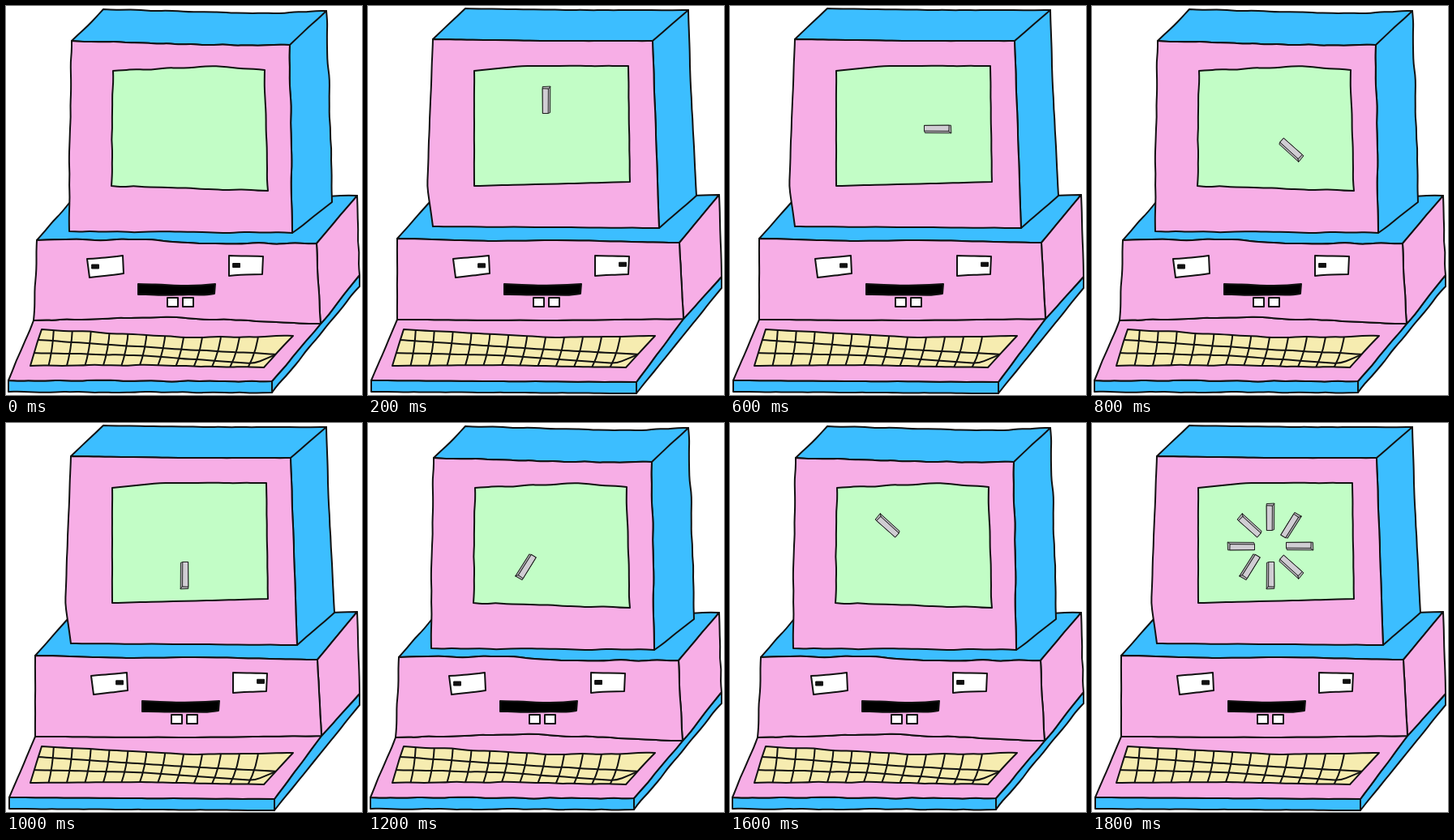
Animation, 439 px wide and 480 px high, one loop 2000 ms. Source, as an HTML page:

```html
<!DOCTYPE html>
<html lang="en">
<head>
<meta charset="utf-8">
<title>Computer with a loading spinner</title>
<style>
  html, body { margin: 0; width: 100%; height: 100%; overflow: hidden; background: #fff; }
  svg { display: block; width: 439px; height: 480px; }
  path { stroke: #111; stroke-width: 2; stroke-linejoin: round; stroke-linecap: round; }
  .bar path { stroke-width: 0.9; }
  .pupil path { stroke-width: 1; }
</style>
</head>
<body>
<svg id="stage" viewBox="0 0 439 480" xmlns="http://www.w3.org/2000/svg"></svg>
<script>
const PINK = '#f7aee6', BLUE = '#3cbeff', GREEN = '#c2fdc6', CREAM = '#f6ecb0';
const STEP = 200, STEPS = 10, BARS = 8, RIM = 14;

// Two drawings of the same machine; faces share these points.
const poses = [
  {
    wobble: 0.9, faceX: 0, glance: 0,
    tl: [81, 43], tm: [256, 48], tr: [350, 48], br: [353, 280], bl: [78, 278], lm: [79, 150],
    backL: [120, 4], backM: [330, 9], backR: [395, 6], sideM: [400, 150], sideB: [402, 242],
    screen: [[132, 80], [253, 74], [319, 79], [323, 228], [130, 222]],
    baseL: [38, 289], baseU: [180, 288], baseD: [239, 293], baseR: [383, 293],
    farL: [78, 243], farR: [433, 234], low: [436, 332],
    deckTL: [34, 388], deckTM: [191, 384], deckTR: [388, 392], deckBL: [3, 462], deckBR: [328, 463]
  },
  {
    wobble: 0.25, faceX: 5, glance: 25,
    tl: [80, 41], tm: [220, 43], tr: [351, 43], br: [359, 274], bl: [80, 272], lm: [73, 222],
    backL: [120, 3], backM: [250, 5], backR: [395, 5], sideM: [398, 100], sideB: [405, 234],
    screen: [[131, 80], [190, 74], [321, 74], [323, 217], [131, 222]],
    baseL: [36, 287], baseU: [150, 290], baseD: [240, 289], baseR: [384, 292],
    farL: [76, 242], farR: [433, 233], low: [436, 334],
    deckTL: [36, 387], deckTM: [220, 388], deckTR: [389, 386], deckBL: [4, 462], deckBR: [331, 464]
  }
];
const keys = [[44, 399], [229, 409], [354, 407], [318, 446], [160, 443], [30, 444]];
const keyRows = [[[38, 412], [221, 424], [338, 430]], [[32, 428], [164, 431], [306, 441], [335, 429]]];
const mouth = [[163, 343], [207, 345], [258, 343], [257, 355], [245, 357], [163, 356]];
const eyes = [
  [[100, 312], [144, 308], [145, 330], [103, 335]],
  [[275, 308], [317, 309], [316, 331], [275, 333]]
];

const lerp = (a, b, t) => a + (b - a) * t;
const mix = (a, b, t) => [lerp(a[0], b[0], t), lerp(a[1], b[1], t)];
const fix = p => p.map(n => n.toFixed(1)).join(' ');
const box = (x, y, w, h) => [[x, y], [x + w, y], [x + w, y + h], [x, y + h]];

// Noise depends on position, so shared edges wobble alike.
const noise = (x, y) => {
  const n = Math.sin(x * 12.9898 + y * 78.233) * 43758.5453;
  return (n - Math.floor(n)) * 2 - 1;
};

function roughen(pts, amp, closed) {
  return pts.flatMap((a, i) => {
    if (i === pts.length - 1 && !closed) return [a];
    const b = pts[(i + 1) % pts.length], out = [a];
    const n = Math.floor(Math.hypot(b[0] - a[0], b[1] - a[1]) / 13);
    for (let k = 1; k < n; k++) {
      const [x, y] = mix(a, b, k / n);
      out.push([x + amp * noise(x, y), y + amp * noise(y, x)]);
    }
    return out;
  });
}

// Rounds gentle bends and keeps sharp corners.
function outline(corners, amp, closed = true) {
  const pts = roughen(corners, amp, closed), n = pts.length;
  let d = 'M' + fix(pts[0]);
  for (let i = 1; i < n; i++) {
    const a = pts[i - 1], p = pts[i], b = pts[(i + 1) % n];
    const turn = Math.atan2(b[1] - p[1], b[0] - p[0]) - Math.atan2(p[1] - a[1], p[0] - a[0]);
    const sharp = Math.cos(turn) < 0.82 || (!closed && i === n - 1);
    d += sharp ? 'L' + fix(p) : 'Q' + fix(p) + ' ' + fix(mix(p, b, 0.5));
  }
  return d + (closed ? 'Z' : '');
}

const path = (d, fill = 'none') => `<path d="${d}" fill="${fill}"/>`;

function computer(p, id) {
  const shape = (pts, fill) => path(outline(pts, p.wobble), fill);
  const line = pts => path(outline(pts, p.wobble * 0.5, false));
  const face = (names, fill) => shape(names.split(' ').map(n => p[n]), fill);
  const drop = ([x, y]) => [x, y + RIM];

  const rim = [p.deckBL, p.deckBR, p.deckTR, p.low, drop(p.low), drop(p.deckBR), drop(p.deckBL)];
  const columns = Array.from({ length: 12 }, (_, i) => {
    const x = 59 + i * 23, lean = 8 + i * 0.7;
    return path(`M${x} 396Q${x - 1} 424 ${x - lean} 450`);
  }).join('');
  const pupils = [[106, 319], [280, 317.5]].map(([x, y]) =>
    shape(box(x + p.glance, y - p.glance * 0.05, 8.5, 5), '#111')).join('');
  const teeth = [199, 218].map(x => shape(box(x, 360, 13, 11), '#fff')).join('');

  return `<g id="pose${id}">` +
    face('baseL baseU baseD baseR farR farL', BLUE) + shape(rim, BLUE) +
    face('baseR farR low deckTR', PINK) +
    face('deckTL deckTM deckTR deckBR deckBL', PINK) +
    face('baseL baseU baseD baseR deckTR deckTM deckTL', PINK) +
    line([p.deckBR, drop(p.deckBR)]) +
    face('tl backL backM backR sideM sideB br tr tm', BLUE) +
    face('tl tm tr br bl lm', PINK) + line([p.tr, p.backR]) + shape(p.screen, GREEN) +
    `<clipPath id="clip${id}">${shape(keys, CREAM)}</clipPath>` + shape(keys, CREAM) +
    `<g clip-path="url(#clip${id})">${columns}${keyRows.map(line).join('')}</g>` +
    `<g transform="translate(${p.faceX} 0)">` +
    eyes.map(e => shape(e, '#fff')).join('') + `<g class="pupil">${pupils}</g>` +
    teeth + shape(mouth, '#000') + '</g></g>';
}

// Bars sit on a ring, clockwise from the top; each axis has its own hand-drawn lean.
function bar(i) {
  const turn = i * 360 / BARS, a = (turn - 90) * Math.PI / 180;
  const lean = [0, -13, 0, -3][i % 4];
  const x = 220 + 36 * Math.cos(a), y = 152 + 36 * Math.sin(a);
  return `<g class="bar" transform="translate(${fix([x, y])}) rotate(${turn + 90 + lean})">` +
    path('M-16.5 -4.8L15.5 -4.6L16.5 -2.2L16.5 4.6L-16 4.8Z', '#b3b0b6') +
    path('M-13.5 -2.4L16.5 -2.2L16.5 4.6L-13.8 4.8Z', '#d0cdd3') +
    path('M-16.5 -4.8L-13.5 -2.4') + '</g>';
}

const stage = document.getElementById('stage');
stage.innerHTML = poses.map(computer).join('') +
  Array.from({ length: BARS }, (_, i) => bar(i)).join('');
const poseEls = poses.map((_, i) => document.getElementById('pose' + i));
const barEls = [...stage.querySelectorAll('.bar')];
const show = (el, on) => { el.style.display = on ? '' : 'none'; };

// Empty screen, then one bar at a time, then the whole ring.
const start = performance.now();
let shown = -1;
function tick(now) {
  const step = Math.floor(Math.max(0, now - start) / STEP) % STEPS;
  if (step !== shown) {
    shown = step;
    poseEls.forEach((el, i) => show(el, step % 2 === i));
    barEls.forEach((el, i) => show(el, step === STEPS - 1 || step === i + 1));
  }
  requestAnimationFrame(tick);
}
tick(start);
</script>
</body>
</html>
```
